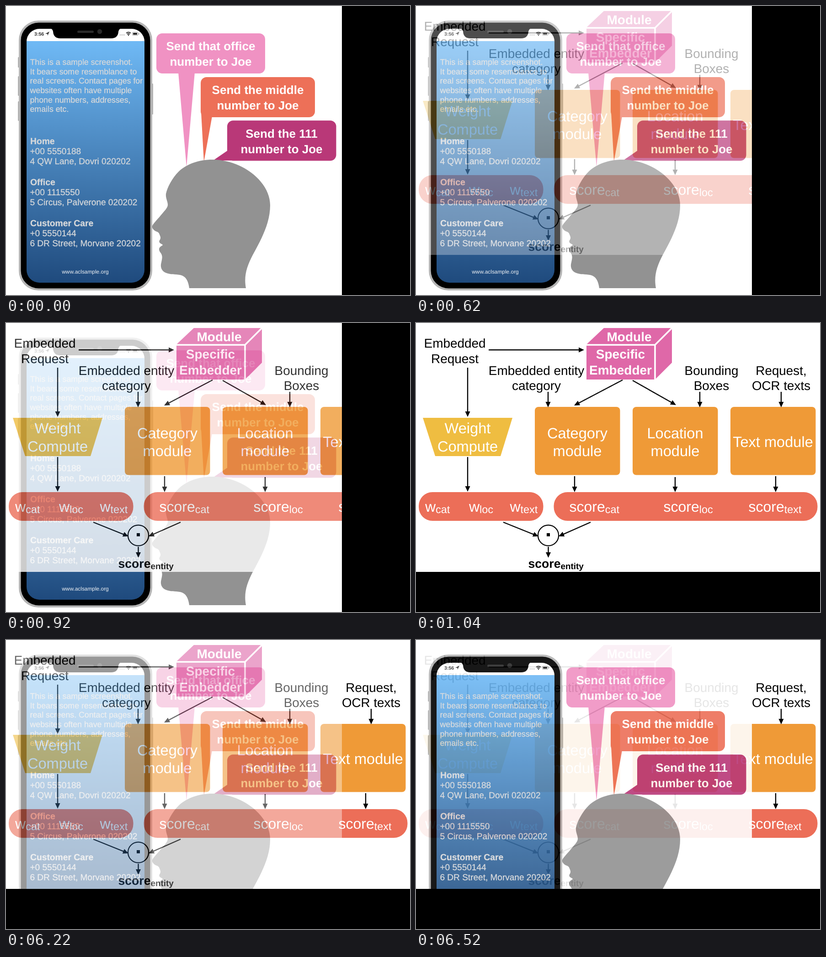
Recreate the animation shown at these times as an HTML page. Size 884 by 634 pixels, loop 6580 ms.

```html
<!DOCTYPE html>
<html lang="en">
<head>
<meta charset="utf-8">
<title>Reference resolution</title>
<style>
  html, body { margin: 0; width: 100%; height: 100%; overflow: hidden; background: #fff; }
  svg { display: block; }
  text { font-family: "Liberation Sans", Arial, Helvetica, sans-serif; text-rendering: geometricPrecision; }
  .page { stroke: #d6d8da; stroke-width: .3; }
</style>
</head>
<body>
<svg id="stage" width="884" height="634" viewBox="0 0 884 634"></svg>
<script>
const RED = '#ec6e58', ORANGE = '#ef9a37', YELLOW = '#efbd41', ROSE = '#df68a8', PALE = '#d6d8da';

const text = (x, y, size, content, { fill = '#000', anchor = 'start', bold = false } = {}) =>
  `<text x="${x}" y="${y}" font-size="${size}" fill="${fill}" text-anchor="${anchor}"${bold ? ' font-weight="700"' : ''}>${content}</text>`;

const lines = (x, y, step, size, rows, options) =>
  rows.map((row, i) => text(x, y + i * step, size, row, options)).join('');

const box = (x, y, w, h, r, fill) =>
  `<rect x="${x}" y="${y}" width="${w}" height="${h}" rx="${r}" fill="${fill}"/>`;

const poly = (points, fill) => `<polygon points="${points}" fill="${fill}"/>`;

function arrow(x1, y1, x2, y2) {
  const angle = Math.atan2(y2 - y1, x2 - x1) * 180 / Math.PI;
  const length = Math.hypot(x2 - x1, y2 - y1);
  return `<g transform="translate(${x1} ${y1}) rotate(${angle})">
    <path d="M0 0H${length - 9}" stroke="#000" stroke-width="2.4"/>
    <path d="M${length} 0l-12 -5.5v11z"/></g>`;
}

const withSub = (x, y, word, sub, size, subSize, options) =>
  text(x, y, size, `${word}<tspan dy="3" font-size="${subSize}">${sub}</tspan>`, options);

function bubble(x, y, w, h, fill, tail, cx, rows) {
  return poly(tail, fill) + box(x, y, w, h, 13, fill) +
    lines(cx, y + 37.3, 34, 26, rows, { fill: '#fff', anchor: 'middle', bold: true });
}

function contact(y, title, phone, address) {
  return text(53, y, 19.3, title, { fill: PALE, bold: true }) +
    lines(52.5, y + 22, 22, 19.05, [phone, address], { fill: PALE });
}

function phone() {
  const metal = '#b4b4b4';
  const buttons = [[26, 112, 23], [26, 154, 43], [26, 209, 43], [317, 170, 68]]
    .map(([x, y, h]) => box(x, y, 5, h, 1.5, metal)).join('');
  const intro = ['This is a sample screenshot.', 'It bears some resemblance to',
    'real screens. Contact pages for', 'websites often have multiple',
    'phone numbers, addresses,', 'emails etc.'];
  return buttons + box(28, 32, 292, 592, 43, metal) + box(32.5, 36.5, 283, 583, 39, '#000') +
    `<g clip-path="url(#screen)">${box(45, 50, 258, 28, 0, '#fff')}${box(45, 77, 258, 531, 0, 'url(#sky)')}</g>
    <path d="M96 49Q102 50 103 56Q104 71 119 71H230Q245 71 246 56Q247 50 253 49Z"/>` +
    box(156, 54, 36, 5, 2.5, '#2b2b2b') + '<circle cx="205" cy="56" r="5.3" fill="#292929"/>' +
    text(62, 65, 10.6, '3:56', { fill: '#333', bold: true }) +
    poly('86,61 95,56 91,65 90.5,61', '#333') +
    `<path d="M249 63.5H260" stroke="#999" stroke-width="1.6" stroke-dasharray="1.8 1.3"/>
    <path d="M263 59.5Q268 55.5 273 59.5M265 62Q268 59.5 271 62" fill="none" stroke="#333" stroke-width="1.7"/>
    <circle cx="268" cy="64" r="1.4" fill="#333"/>
    <rect x="276.5" y="57.5" width="12.5" height="7" rx="2" fill="none" stroke="#999"/>` +
    box(278, 59, 9, 4, 1, '#222') + box(290, 59.5, 1.3, 3, .6, '#999') +
    '<g class="page">' + lines(52.5, 129.2, 20.6, 17.75, intro, { fill: PALE }) +
    contact(303, 'Home', '+00 5550188', '4 QW Lane, Dovri 020202') +
    contact(393, 'Office', '+00 1115550', '5 Circus, Palverone 020202') +
    contact(483, 'Customer Care', '+0 5550144', '6 DR Street, Morvane 20202') + '</g>' +
    text(173.5, 587, 11.9, 'www.aclsample.org', { fill: '#eef1f4', anchor: 'middle' });
}

function requestScene() {
  const head = `M401 619C399 603 393 592 381 590C371 588 360 590 349 585C340 581 337 572 340 562
    C342 553 343 547 338 541C334 536 334 531 338 528C342 525 344 525 342 523C336 520 334 518 336 514
    C338 511 339 508 337 504C335 499 335 497 330 495C324 493 319 488 320 483C321 478 330 470 338 460
    C346 450 354 443 354 436C354 428 349 422 350 412C353 398 363 378 378 363C395 347 421 337 452 337
    C516 337 578 385 578 437C578 477 558 513 540 546C527 571 520 592 525 619Z`;
  return box(0, 0, 884, 634, 0, '#fff') + phone() +
    bubble(329, 60, 238, 88, '#f092c3', '377,146 413,146 395,353', 448, ['Send that office', 'number to Joe']) +
    bubble(426, 156, 250, 88, '#ed7058', '426,215 451,242 433,342', 551, ['Send the middle', 'number to Joe']) +
    bubble(484, 251.3, 238.5, 88.3, '#b93878', '485,317 453,339 500,339', 603, ['Send the 111', 'number to Joe']) +
    `<path d="${head}" fill="#929292"/>` + box(735, 0, 149, 634, 0, '#000');
}

function modelScene() {
  const mid = { anchor: 'middle' };
  const white = { anchor: 'middle', fill: '#fff' };
  const whiteBold = { ...white, bold: true };
  const arrows = [
    [159, 59, 368, 59], [113, 98, 113, 206], [289, 151, 289, 185], [452, 125, 346, 181],
    [474, 126, 569, 180], [621, 151, 621, 185], [799, 151, 799, 185], [113, 294, 113, 370],
    [347, 336, 347, 371], [567, 338, 567, 371], [787, 336, 787, 371],
    [289.5, 491, 289.5, 515]
  ];
  const scores = [[20, 'w', 'cat'], [116, 'w', 'loc'], [205.5, 'w', 'text'],
    [335.5, 'score', 'cat'], [541.5, 'score', 'loc'], [727.5, 'score', 'text']];
  return box(0, 0, 884, 546, 0, '#fff') + box(0, 546, 884, 88, 0, '#000') +
    poly('15,208 211,208 185,292 42,292', YELLOW) +
    [260, 474, 688].map(x => box(x, 184, 186.5, 149.5, 8, ORANGE)).join('') +
    box(6, 371, 272.5, 63, 30, RED) + box(301.5, 371, 577, 63, 30, RED) +
    poly('373,47 411,11 560,11 560,87 523,124 373,124', ROSE) +
    '<path d="M372 48H523L561 10M523 48V125" fill="none" stroke="#fff" stroke-width="3.6"/>' +
    text(466.5, 39.5, 28, 'Module', whiteBold) +
    lines(447.5, 78, 34.5, 28, ['Specific', 'Embedder'], whiteBold) +
    lines(85, 54, 33.5, 27.9, ['Embedded', 'Request'], mid) +
    lines(263.5, 113.5, 33.5, 27.9, ['Embedded entity', 'category'], mid) +
    lines(646.5, 113.5, 33.5, 27.9, ['Bounding', 'Boxes'], mid) +
    lines(799, 113.5, 33.5, 27.8, ['Request,', 'OCR texts'], mid) +
    lines(113, 242, 39.5, 32.6, ['Weight', 'Compute'], white) +
    lines(353, 252.5, 39.5, 32.6, ['Category', 'module'], white) +
    lines(567, 252.5, 39.5, 32.6, ['Location', 'module'], white) +
    text(781, 272, 32.6, 'Text module', white) +
    scores.map(([x, word, sub]) => withSub(x, 413.5, word, sub, 32, 23.4, { fill: '#fff' })).join('') +
    arrows.map(a => arrow(...a)).join('') +
    '<circle cx="289.5" cy="466" r="22.6" fill="#fff" stroke="#000" stroke-width="2.2"/>' +
    box(286, 461, 7, 7, 0, '#000') +
    arrow(191, 437, 268, 468) + arrow(382, 437, 312, 468) +
    withSub(245.5, 536.5, 'score', 'entity', 26.6, 18.9, { bold: true });
}

document.getElementById('stage').innerHTML = `
  <defs>
    <linearGradient id="sky" x1="0" y1="0" x2="0" y2="1">
      <stop offset="0" stop-color="#6fb9f5"/><stop offset="1" stop-color="#1f4a7d"/>
    </linearGradient>
    <clipPath id="screen"><rect x="45" y="50" width="258" height="557" rx="28"/></clipPath>
    <clipPath id="overlap"><rect width="735" height="546"/></clipPath>
    <g id="request">${requestScene()}</g>
    <g id="model">${modelScene()}</g>
  </defs>
  <use id="base" href="#request"/>
  <g clip-path="url(#overlap)"><use id="overlay" href="#model" opacity="0"/></g>`;

const LOOP = 6580, STEP = 60, FADE_IN = 500, FADE_BACK = 6040;
const base = document.getElementById('base');
const overlay = document.getElementById('overlay');

function set(element, name, value) {
  if (element.getAttribute(name) !== String(value)) element.setAttribute(name, value);
}

const fade = (t, from) => t < from ? 0 : (Math.floor((t - from) / STEP) + 1) / 10;

function render(t) {
  const modelAlpha = fade(t, FADE_IN);
  const modelShown = modelAlpha >= 1;
  set(base, 'href', modelShown ? '#model' : '#request');
  set(overlay, 'href', modelShown ? '#request' : '#model');
  set(overlay, 'opacity', modelShown ? fade(t, FADE_BACK) : modelAlpha);
}

const start = performance.now();
function tick() {
  render((performance.now() - start) % LOOP);
  requestAnimationFrame(tick);
}
tick();
</script>
</body>
</html>
```
